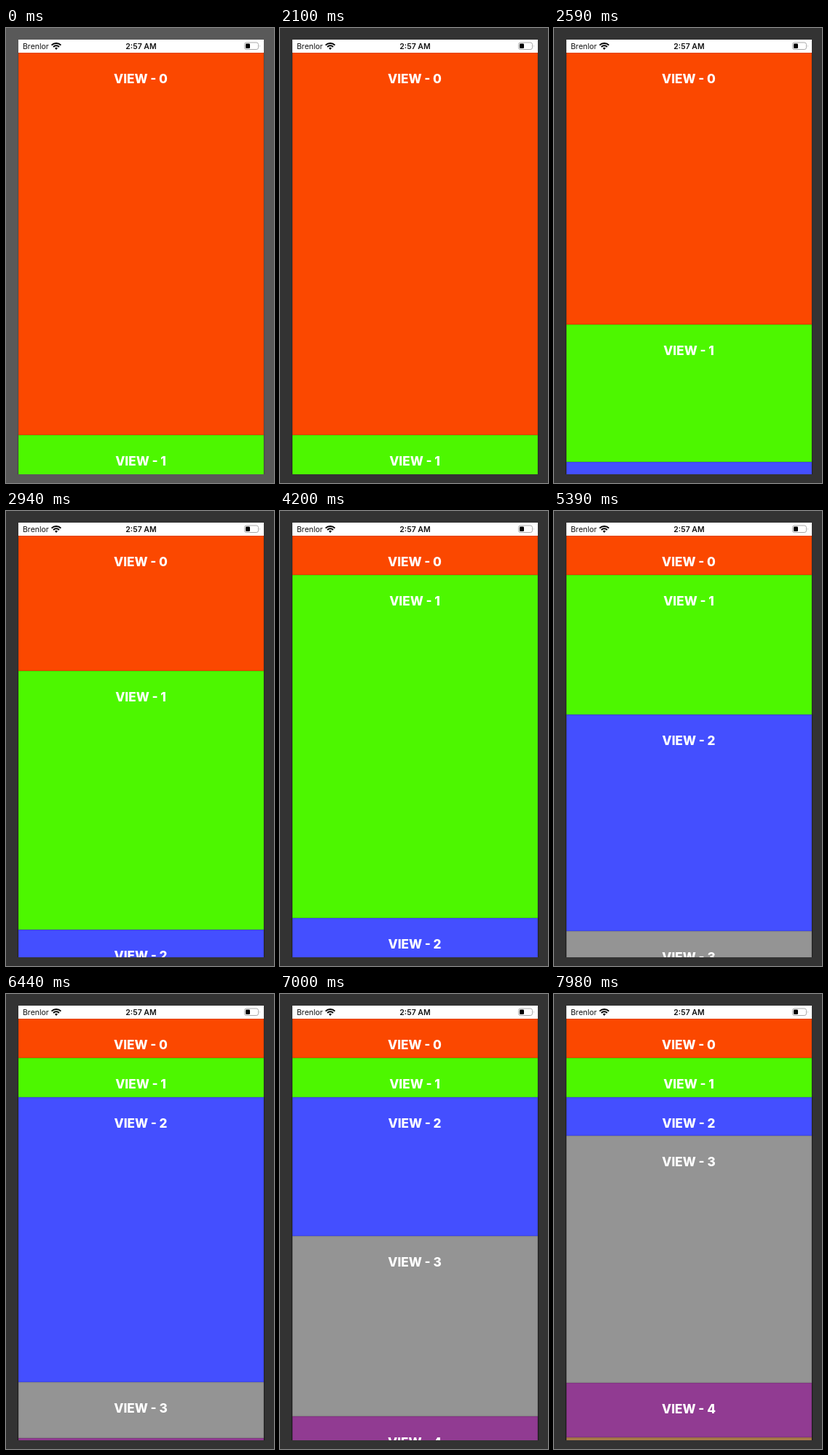
An HTML page for the animation above (8000 ms loop, 368 by 626 pixels).

```html
<!DOCTYPE html>
<html lang="en">
<head>
<meta charset="utf-8">
<title>Stacking cards</title>
<style>
  html, body { margin: 0; width: 100%; height: 100%; overflow: hidden; }
  body { position: relative; font-family: Inter, Roboto, sans-serif; }
  #screen {
    position: absolute; left: 17px; top: 16px; width: 337px; height: 598px;
    background: #fff; clip-path: inset(0 -3px 0 -3px);
  }
  .card {
    position: absolute; left: 0; top: 0; width: 336px; height: 600px; padding-right: 1px;
    box-shadow: 0 0 2px rgba(0, 0, 0, .3), inset 0 0 2px rgba(0, 0, 0, .35);
    color: #fff; font: 800 17.1px/72px Inter, Roboto, sans-serif; text-align: center;
  }
  #status { position: absolute; left: 0; top: 0; width: 337px; height: 18px; background: #fff; }
</style>
</head>
<body>
<div id="screen">
  <svg id="status" viewBox="17 16 337 18" fill="none">
    <g fill="#111" font-size="10.5">
      <text x="23" y="29">Brenlor</text>
      <text x="185.5" y="29" font-weight="600" text-anchor="middle">2:57 AM</text>
    </g>
    <g stroke="#000" stroke-width="2">
      <path d="M62.6 23.6a9 9 0 0 1 12.8 0M65 26a5.6 5.6 0 0 1 8 0"/>
      <path d="M67 27.8a2.9 2.9 0 0 1 4 0L69 30z" fill="#000" stroke="none"/>
    </g>
    <rect x="327.5" y="20" width="19" height="9.5" rx="2.6" stroke="#aaa"/>
    <path d="M348 23.2q1.4 1.5 0 3z" fill="#aaa"/>
    <rect x="329" y="21.5" width="6" height="6.5" rx="1.3" fill="#000"/>
  </svg>
</div>
<script>
const LOOP = 8000, STEP = 70, BAR = 18, PEEK = 53.8, NEXT = 544.4;
const colors = ['#fb4800', '#4df700', '#444fff', '#949494', '#913b92', '#a8794a'];
// Start and duration of each swipe to the next card
const swipes = [[2100, 1290], [4270, 1820], [6220, 1340], [7743, 1340]];

const screen = document.getElementById('screen');
const cards = colors.map((color, i) => {
  const card = document.createElement('div');
  card.className = 'card';
  card.style.background = color;
  card.textContent = 'VIEW - ' + i;
  screen.insertBefore(card, document.getElementById('status'));
  return card;
});

const clamp = x => Math.min(1, Math.max(0, x));
const ease = x => x * x * (3 - 2 * x);

// Pinned below the bar, then waiting at the bottom, then below the screen
function cardTop(i, page) {
  const ahead = i - page, pinned = BAR + PEEK * i;
  if (ahead <= 0) return pinned;
  if (ahead <= 1) return pinned + (NEXT - pinned) * ahead;
  return NEXT + 54 * (ahead - 1);
}

function draw(now) {
  const t = Math.floor(now % LOOP / STEP) * STEP;
  const page = swipes.reduce((sum, [start, length]) => sum + ease(clamp((t - start) / length)), 0);
  const shade = Math.round(89 - 38 * clamp((t - 490) / 210));
  document.body.style.background = `rgb(${shade},${shade},${shade})`;
  cards.forEach((card, i) => {
    const top = Math.round(cardTop(i, page));
    card.style.transform = `translateY(${top}px)`;
    card.style.visibility = top < 598 ? 'visible' : 'hidden';
  });
  requestAnimationFrame(draw);
}
draw(performance.now());
</script>
</body>
</html>
```
